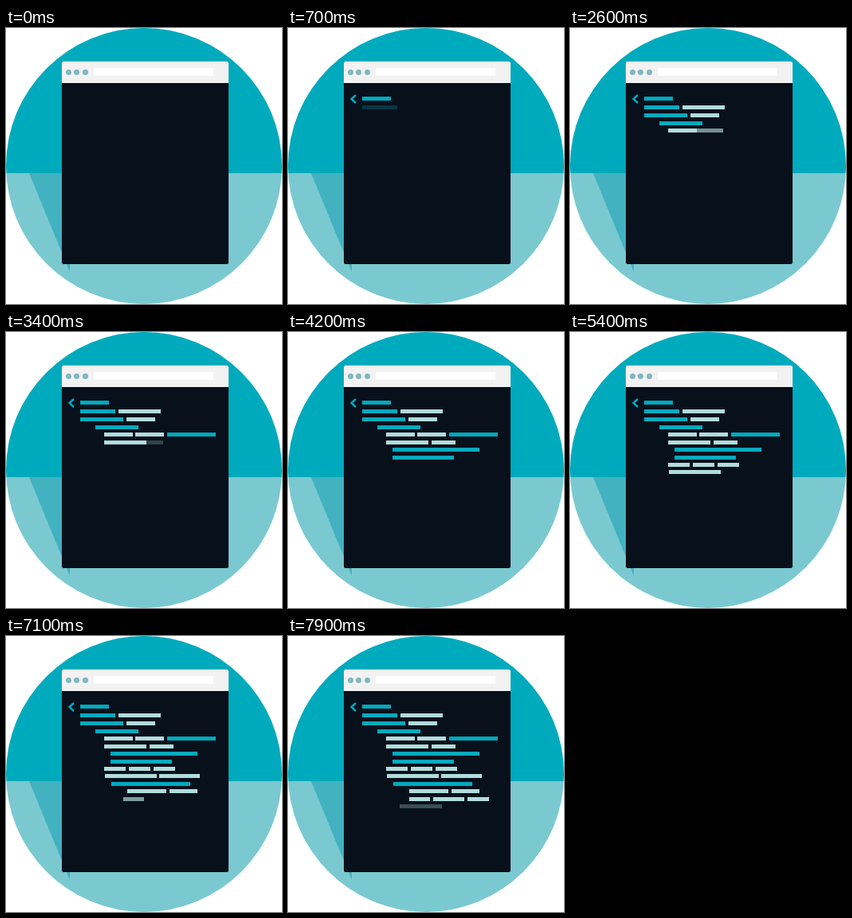
These frames come from a looping animation (346x346 px, 8000 ms). An HTML page:

```html
<!DOCTYPE html>
<html>
<head>
<meta charset="utf-8">
<style>
html, body { margin: 0; width: 100%; height: 100%; overflow: hidden; background: #fff; }
svg { display: block; width: 100vw; height: 100vh; }
</style>
</head>
<body>
<svg viewBox="0 0 346 346">
  <clipPath id="disc"><circle cx="173" cy="173" r="173"/></clipPath>
  <g clip-path="url(#disc)">
    <rect width="346" height="182" fill="#00aabd"/>
    <rect y="182" width="346" height="164" fill="#7ac9d1"/>
    <path d="M29 182H80V306Z" fill="#42b2c0"/>
  </g>
  <rect x="70" y="42" width="209" height="254" rx="2" fill="#08101b"/>
  <path d="M70 69V44q0-2 2-2H277q2 0 2 2V69Z" fill="#f2f2f2"/>
  <g fill="#7fb7bf">
    <circle cx="78.5" cy="55.5" r="3.5"/>
    <circle cx="88.5" cy="55.5" r="3.5"/>
    <circle cx="99.5" cy="55.5" r="3.5"/>
  </g>
  <rect x="110" y="50" width="150" height="10" fill="#fff"/>
  <g id="code"></g>
</svg>
<script>
const LOOP = 8000, FIRST = 40, STEP = 300, FADE = 250, SLIDE = 17;
const PAUSE_AT = 19, PAUSE = 285;
const TEAL = '#00aabd', PALE = '#b0dcdc';
const code = document.getElementById('code');

function add(name, attrs) {
  const el = document.createElementNS('http://www.w3.org/2000/svg', name);
  for (const key in attrs) el.setAttribute(key, attrs[key]);
  return code.appendChild(el);
}

// Each line: y, then "x width" per token; t = teal, p = pale
const lines = [
  [86, 't93 36'],
  [97, 't93 44', 'p141 53'],
  [107, 't93 54', 'p151 36'],
  [117, 't112 54'],
  [126, 'p123 36', 'p162 36', 't202 61'],
  [136, 'p123 53', 'p180 30'],
  [145, 't131 109'],
  [155, 't131 77'],
  [164, 'p123 27', 'p154 27', 'p185 27'],
  [173, 'p124 65', 'p192 51'],
  [183, 't132 99'],
  [192, 'p152 49', 'p205 35'],
  [202, 'p152 26', 'p182 39', 'p225 27'],
  [211, 'p152 53']
];

const tokens = [{
  el: add('path', { d: 'M85 84L79.5 89L85 94', fill: 'none', stroke: TEAL, 'stroke-width': 2.5 }),
  slide: 0
}];
for (const [y, ...bars] of lines) {
  for (const bar of bars) {
    const [x, width] = bar.slice(1).split(' ').map(Number);
    const fill = bar[0] === 't' ? TEAL : PALE;
    tokens.push({
      el: add('rect', { x, y, width, height: 5, fill }),
      slide: x === 93 ? 0 : SLIDE
    });
  }
}

function draw(now) {
  const time = Math.floor(now % LOOP / 100) * 100;
  tokens.forEach(({ el, slide }, i) => {
    const start = FIRST + i * STEP + (i >= PAUSE_AT ? PAUSE : 0);
    const p = Math.min(1, Math.max(0, (time - start) / FADE));
    el.setAttribute('opacity', p);
    el.setAttribute('transform', `translate(${Math.round(-slide * (1 - p))} 0)`);
  });
  requestAnimationFrame(draw);
}
draw(0);
</script>
</body>
</html>
```
